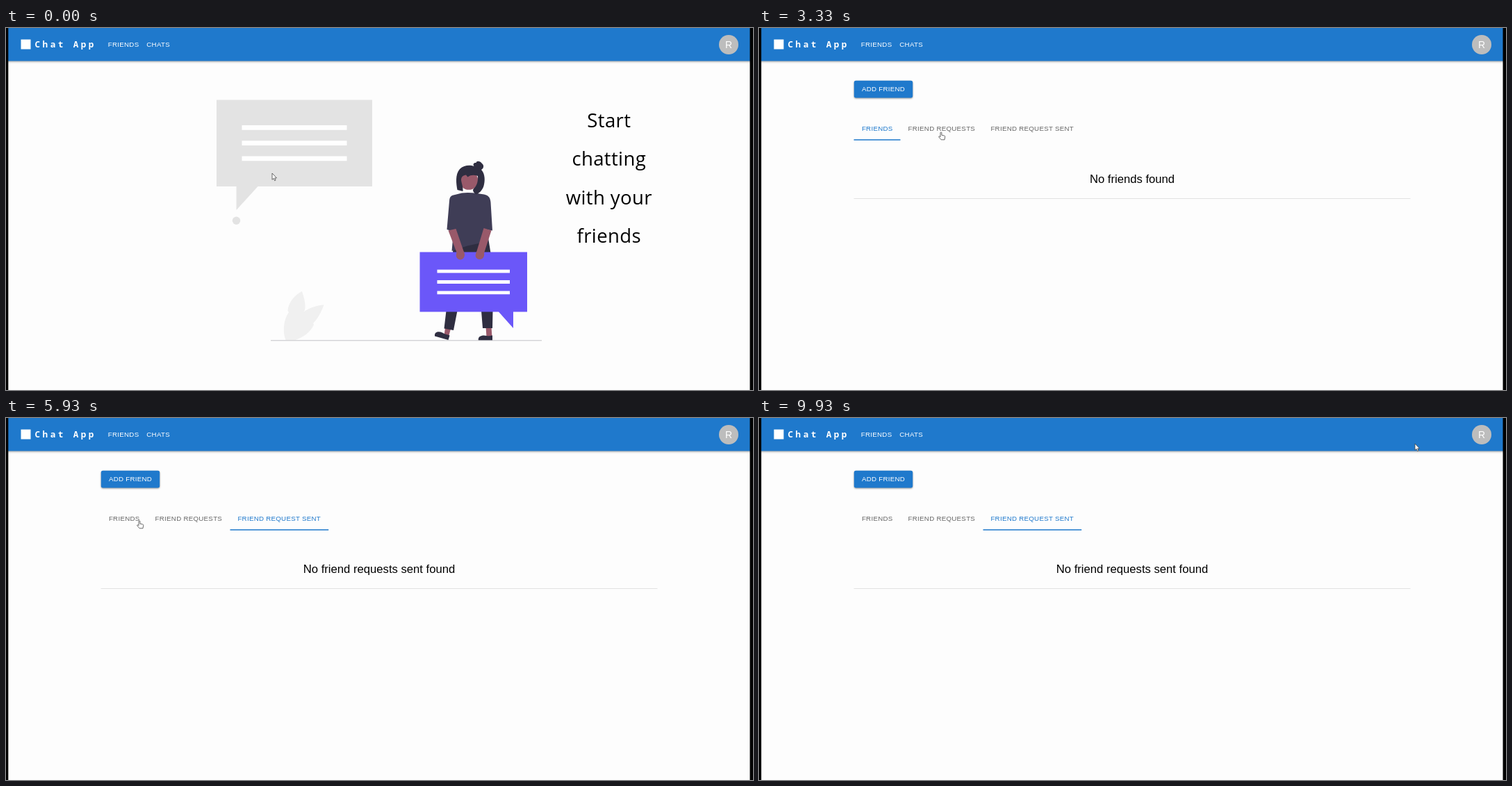
These frames come from a looping animation (1075 by 521 pixels, 10000 ms). An HTML page:

```html
<!DOCTYPE html>
<html lang="en">
<head>
<meta charset="utf-8">
<title>Chat App</title>
<style>
  html, body { margin: 0; width: 100%; height: 100%; overflow: hidden; background: #fdfdfd; }
  svg { display: block; width: 100vw; height: 100vh; font-family: "Liberation Sans", Arial, sans-serif; }
  .label { font-size: 9.73px; letter-spacing: .278px; }
  .brand { font: 700 12.6px "Noto Sans Mono", monospace; letter-spacing: 3.47px; }
  .hero { font: 27.5px "Comic Sans MS", "Open Sans", sans-serif; letter-spacing: .4px; text-anchor: middle; }
  .message { font-size: 16.67px; text-anchor: middle; }
  .bar { filter: drop-shadow(0 1.5px 1.8px rgba(0,0,0,.38)); }
  .raised { filter: drop-shadow(0 1.2px 1.1px rgba(0,0,0,.4)); }
  .light { fill: #fff; }
  .skin { fill: #99596a; }
  .dark { fill: #2f2e41; }
  .shirt { fill: #3f3d56; }
  .pointer { fill: #fff; stroke: #444; stroke-width: .8; stroke-linejoin: round; }
</style>
</head>
<body>
<svg viewBox="0 0 1075 521" preserveAspectRatio="none">
  <defs>
    <clipPath id="clip"><rect id="clipBox" /></clipPath>
  </defs>
  <rect width="1075" height="521" fill="#fdfdfd" />

  <g id="home">
    <g fill="#e3e3e3">
      <path d="M303 103.5H527V228H362.5L331.5 262V228H303Z" />
      <circle cx="331.5" cy="277.2" r="5.7" />
    </g>
    <path class="light" d="M339.5 140h151v6.8h-151zM339.5 162.2h151v6.8h-151zM339.5 184.4h151v6.8h-151z" />

    <path fill="#f0f0f0" d="M426 379C415 384 406 396 405.500 407L407 409C399 420 398 438 402.500 449.300H416C428 445 438 438 443 427L442 425C449 418 454 408 457.500 398.500C447 399 436 403 428.500 408.500L430 406C432 396 428 386 426 379Z" />
    <path stroke="#c2c2c6" d="M381 449.800H771" />

    <!-- legs and shoes -->
    <path class="skin" d="M632 432L640 433L637 444L630.500 442ZM690.500 430H698.500L699.500 445H691.500Z" />
    <path class="dark" d="M633.500 407H649.500L644 435L630.500 432.500ZM684 407H700.500L700 432H686ZM617 442C617 437 623 436 628 438.500C632 441 635 441 638.500 442.500L636.500 449L617 443.500ZM679.800 449.300C679 443 686 441.500 692 443C695 444 698 442 700 442.500V449.300Z" />

    <!-- body -->
    <path class="dark" d="M644 306L694 302L697.500 324H643Z" />
    <path class="shirt" d="M656 237.500C667 236 679 238 688 239.500C695 241 697 245 697.500 251L700 291.500L690 290L694 307L664 313.500L641.500 321L644 293L634.500 290L638 249C638.500 243 640 241 646 240Z" />
    <path fill="#6b57f9" d="M595.500 322.500H750V408.500H730V432L709 408.500H595.500Z" />
    <path class="light" d="M620.500 347.700h104.500v4.800h-104.500zM620.500 363.100h104.500v4.800h-104.500zM620.500 378.400h104.500v4.800h-104.500z" />
    <path class="skin" d="M636.500 291.500L647.500 289L658.500 321C662 327 659 333 654 333.500C648 333 647 328 648.500 323ZM687.500 288L698.500 291.500L688 324C689 329 686 333.500 681 333C675 332 674.500 327 677.500 321Z" />

    <!-- head -->
    <circle class="skin" cx="666" cy="219.500" r="13.300" />
    <path class="dark" d="M649.500 233C648 224 646 211 653 203C659 197 668 197 673.500 199C671.500 196 673 193.500 676.500 194C677 191 682 191 685 195C688 197 688 202 684 204C688 208 690 216 688 225C687 231 683 237 676.500 239.500C672 236 670.500 233 674 230C678 226 679.500 220 679 213C674 211.500 669 211 664.500 214.500L662 211.500C658 212 655 214 655 219C656 225 658 229 657.500 235Z" />

    <g class="hero">
      <text x="867.800" y="142.500">Start</text>
      <text x="867.800" y="198">chatting</text>
      <text x="867.800" y="253.500">with your</text>
      <text x="867.800" y="309">friends</text>
    </g>
  </g>

  <g id="friends">
    <rect class="raised" x="136.800" y="75.700" width="84.400" height="24.800" rx="2.700" fill="#1f79cc" />
    <text class="label light" x="147.900" y="91.300">ADD FRIEND</text>
    <g id="tabs" class="label">
      <text x="147.900" y="148">FRIENDS</text>
      <text x="214.600" y="148">FRIEND REQUESTS</text>
      <text x="333.400" y="148">FRIEND REQUEST SENT</text>
    </g>
    <rect id="marker" y="160.200" height="1.500" fill="#1f79cc" />
    <text id="message" class="message" x="537" y="223"></text>
    <path stroke="#e2e2e2" d="M136.500 245.500H937.500" />
  </g>

  <rect class="bar" width="1075" height="47.500" fill="#1f79cc" />
  <rect class="light" x="21.500" y="16.500" width="14" height="14" />
  <text class="brand light" x="41.600" y="28.300">Chat App</text>
  <text class="label light" x="146.800" y="27.300">FRIENDS</text>
  <text class="label light" x="202.300" y="27.300">CHATS</text>
  <circle cx="1040" cy="24" r="14" fill="#bdbdbd" />
  <text class="light" x="1040" y="28.500" font-size="13.900" text-anchor="middle">R</text>

  <g clip-path="url(#clip)"><circle id="ripple" /></g>
  <path d="M0 0H3.300V521H0ZM1070.500 0H1075V521H1070.500Z" />

  <circle id="ring" r="22.300" fill="none" stroke="#e12841" stroke-width="2.300" />
  <g id="cursor" class="pointer">
    <path id="arrow" d="M0 0V9.300L2.100 7.400L3.600 10.700L5.100 10L3.700 6.900H6.500Z" />
    <path id="hand" d="M-1 .8C-1 -.4 .9 -.4 .9 .8V4.200L4.600 5C5.500 5.200 5.900 5.800 5.700 6.700L5 10.800H.1L-3.300 6.800C-3.600 6 -2.500 5.500 -1.800 6.100L-1 6.800Z" />
  </g>
</svg>
<script>
  const LOOP = 10000, STEP = 1000 / 15;
  const SWITCH = 1760;

  // time, x, y of the pointer's hot spot
  const path = [
    [0, 383, 209], [400, 383, 209], [1250, 176, 27], [1950, 176, 27],
    [3050, 262, 150], [3900, 262, 150], [4480, 358, 141], [5150, 358, 141],
    [5850, 192, 148], [6000, 192, 148], [6950, 869, 0], [7650, 869, 0],
    [8500, 944, 37], [LOOP, 944, 37]
  ];
  const tabs = [
    { at: 0, x: 136.5, w: 67, text: "No friends found" },
    { at: 3620, x: 203.5, w: 119, text: "No friend requests found" },
    { at: 4700, x: 322.5, w: 141.7, text: "No friend requests sent found" }
  ];
  const clicks = [
    { at: 1450, box: [138, 11.5, 62, 25], tint: "#fff", alpha: .22 },
    { at: 3460, box: [203.5, 128, 119, 33], tint: "#1f79cc", alpha: .13 },
    { at: 4580, box: [322.5, 128, 142, 33], tint: "#1f79cc", alpha: .13 }
  ];

  const $ = id => document.getElementById(id);
  const set = (el, attrs) => { for (const k in attrs) el.setAttribute(k, attrs[k]); };
  const show = (el, on) => { el.style.display = on ? "" : "none"; };
  const clamp = v => Math.min(1, Math.max(0, v));
  const ease = v => v * v * (3 - 2 * v);
  const mix = (a, b, k) => a + (b - a) * k;
  const within = (x, y, l, t, r, b) => x >= l && x <= r && y >= t && y <= b;

  function pointerAt(t) {
    const i = path.findIndex(p => p[0] > t);
    const a = path[i - 1], b = path[i];
    const k = ease((t - a[0]) / (b[0] - a[0]));
    return [mix(a[1], b[1], k), mix(a[2], b[2], k)];
  }

  function drawTabs(t) {
    const now = tabs.findLastIndex(tab => t >= tab.at);
    const cur = tabs[now], prev = tabs[Math.max(0, now - 1)];
    const k = ease(clamp((t - cur.at) / 300));
    set($("marker"), { x: mix(prev.x, cur.x, k), width: mix(prev.w, cur.w, k) });
    [...$("tabs").children].forEach((el, i) => set(el, { fill: i === now ? "#1f79cc" : "#666" }));
    $("message").textContent = cur.text;
  }

  function drawClick(t, x, y) {
    const click = clicks.find(c => t >= c.at && t < c.at + 700);
    show($("ring"), click);
    show($("ripple"), click);
    if (!click) return;
    const age = t - click.at;
    set($("ring"), { cx: x, cy: y, opacity: .7 * clamp((480 - age) / 120) });
    const [bx, by, width, height] = click.box;
    set($("clipBox"), { x: bx, y: by, width, height });
    set($("ripple"), {
      cx: x, cy: y, r: mix(2, width * .65, ease(clamp(age / 550))),
      fill: click.tint, opacity: click.alpha * clamp((700 - age) / 350) * clamp(age / 100)
    });
  }

  function draw(t) {
    const home = t < SWITCH;
    show($("home"), home);
    show($("friends"), !home);
    drawTabs(t);

    const [x, y] = pointerAt(t);
    const link = within(x, y, 138, 12, 246, 36) ||
      (!home && (within(x, y, 137, 128, 464, 162) || within(x, y, 137, 76, 221, 100)));
    set($("cursor"), { transform: `translate(${x} ${y})` });
    show($("arrow"), !link);
    show($("hand"), link);
    drawClick(t, x, y);
  }

  const start = performance.now();
  function tick() {
    const t = (performance.now() - start) % LOOP;
    draw(Math.min(LOOP - 1, Math.floor((t + 10) / STEP) * STEP));
    requestAnimationFrame(tick);
  }
  tick();
</script>
</body>
</html>
```
